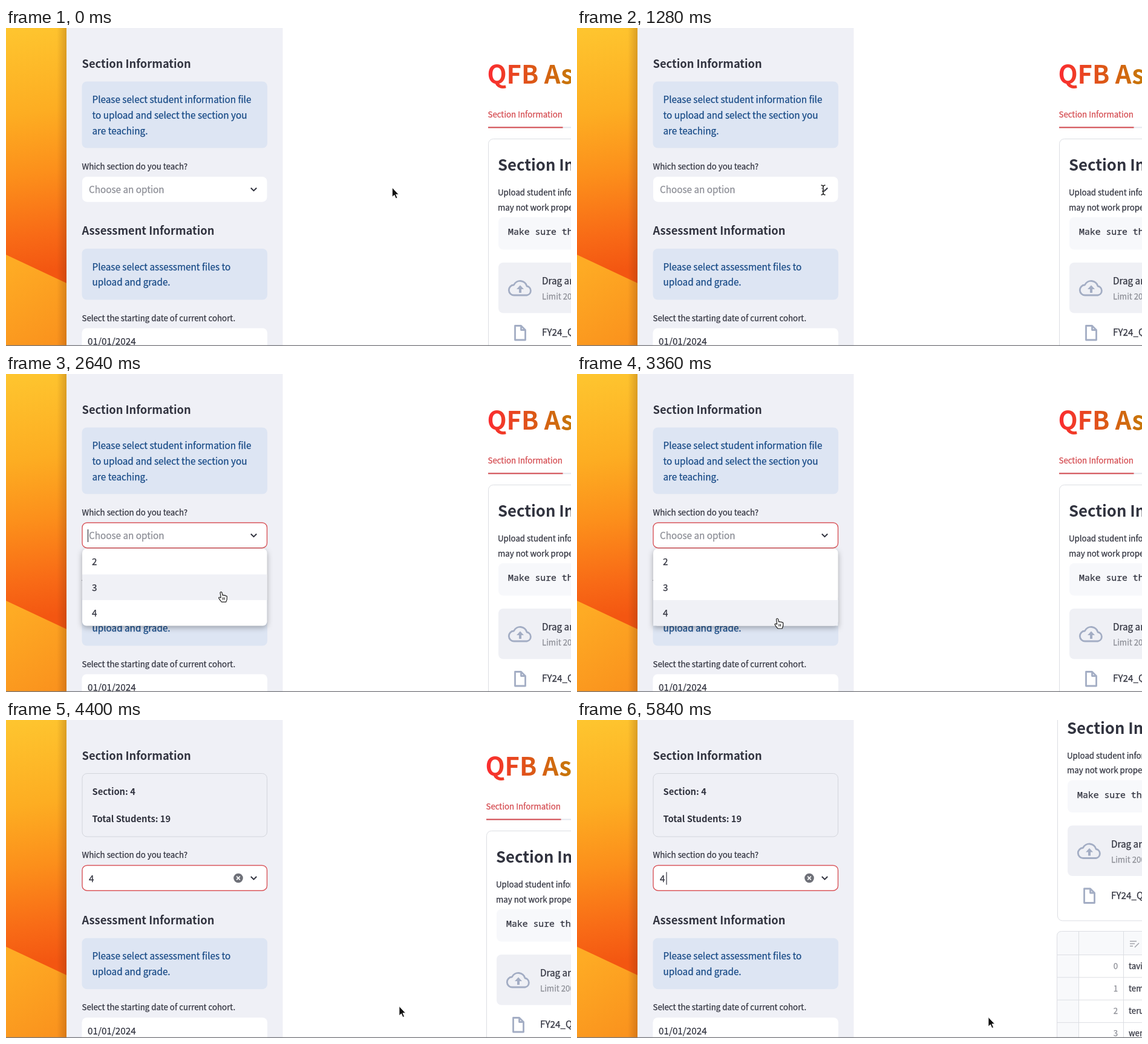
Animation, 934 px wide and 526 px high, one loop 5920 ms. Source, as an HTML page:

```html
<!DOCTYPE html>
<html lang="en">
<head>
<meta charset="utf-8">
<title>Section picker</title>
<style>
  html, body { margin: 0; width: 100%; height: 100%; overflow: hidden; background: #fff; }
  svg { display: block; width: 100vw; height: 100vh; }
  text {
    font: 15.25px "Noto Sans CJK JP", "Noto Sans CJK SC", "Noto Sans CJK", "Noto Sans", sans-serif;
    color: #31333f; fill: currentColor; stroke: currentColor; stroke-width: .25px; white-space: pre;
  }
  .small { font-size: 13.28px; }
  .bold { font-size: 14.7px; font-weight: 700; stroke: none; }
  .head { font-size: 18.3px; font-weight: 700; stroke: none; }
  .big { font-size: 25.7px; font-weight: 700; stroke: none; }
  .title { font-size: 41.7px; font-weight: 700; fill: url(#titleFill); stroke: none; }
  .mono { font-family: "Noto Sans Mono", "DejaVu Sans Mono", monospace; font-size: 14.8px; }
  .blue { color: #174a86; }
  .red { color: #d4494e; }
  .grey { color: #8b8d95; }
  .info { fill: #dde5f3; }
  .white { fill: #fff; }
  .line { fill: none; stroke: #dcdee3; }
  .icon { fill: none; stroke: #a3adc4; stroke-width: 2.8; stroke-linejoin: round; }
  #box { stroke-width: 1.4; }
  #menu { filter: drop-shadow(0 3px 5px rgba(0, 0, 0, .3)); }
</style>
</head>
<body>
<svg viewBox="0 0 934 526" preserveAspectRatio="none">
  <defs>
    <linearGradient id="sky" gradientUnits="userSpaceOnUse" x1="20" y1="0" x2="80" y2="400">
      <stop offset="0" stop-color="#fec52f"/>
      <stop offset=".35" stop-color="#fdad22"/>
      <stop offset=".6" stop-color="#fc8f1b"/>
      <stop offset=".85" stop-color="#f86a16"/>
      <stop offset="1" stop-color="#f35611"/>
    </linearGradient>
    <linearGradient id="dune" gradientUnits="userSpaceOnUse" x1="0" y1="400" x2="80" y2="526">
      <stop offset="0" stop-color="#feab24"/>
      <stop offset="1" stop-color="#fa921d"/>
    </linearGradient>
    <linearGradient id="shade">
      <stop offset="0" stop-color="#5a2000" stop-opacity="0"/>
      <stop offset="1" stop-color="#5a2000" stop-opacity=".22"/>
    </linearGradient>
    <linearGradient id="titleFill" gradientUnits="userSpaceOnUse" x1="797" y1="0" x2="937" y2="0">
      <stop offset="0" stop-color="#fb2c30"/>
      <stop offset=".5" stop-color="#de5618"/>
      <stop offset="1" stop-color="#c67808"/>
    </linearGradient>
  </defs>

  <rect class="white" width="934" height="526"/>
  <rect width="100" height="526" fill="url(#sky)"/>
  <path d="M0 375L100 422V526H0z" fill="url(#dune)"/>
  <rect x="84" width="16" height="526" fill="url(#shade)"/>
  <rect x="100" width="357.5" height="526" fill="#eff0f6"/>

  <!-- Main panel -->
  <g id="panel">
    <text class="title" x="795.5" y="91.5">QFB Assessment</text>
    <text class="small red" x="796.5" y="147.5">Section Information</text>
    <path d="M797 164.5H960" stroke="#e4e7ee" stroke-width="2"/>
    <path d="M797 164.5H920.5" stroke="#d4494e" stroke-width="2"/>
    <rect class="line" x="797.5" y="183.5" width="300" height="362" rx="8"/>
    <text class="big" x="813" y="236">Section Information</text>
    <text class="small" x="813" y="277">Upload student information file. The app</text>
    <text class="small" x="813" y="301.5">may not work properly without it.</text>
    <rect x="814" y="313" width="200" height="53.5" rx="8" fill="#f7f8fb"/>
    <text class="mono" x="830" y="342">Make sure the file is valid</text>
    <rect x="814" y="388" width="200" height="83.5" rx="8" fill="#eff0f5"/>
    <path class="icon" d="M840 442a8.5 8.5 0 0 1-.5-17a11.5 11.5 0 0 1 21.5 2a7.6 7.6 0 0 1 0 15z"/>
    <path d="M848 438v-6h-4l6-6.5 6 6.5h-4v6z" fill="#a3adc4"/>
    <text x="886" y="424">Drag and drop file here</text>
    <text class="small grey" x="886" y="449">Limit 200MB per file</text>
    <path class="icon" d="M841.5 492.5h10l7 7v16.500h-17zM851.5 492.5v7h7"/>
    <text x="886" y="509">FY24_QFB.csv</text>
    <g id="table"></g>
  </g>

  <!-- Sidebar -->
  <text class="head" x="125.5" y="66">Section Information</text>
  <g id="hint">
    <rect class="info" x="125.5" y="88.5" width="306.5" height="110" rx="8"/>
    <text class="blue" x="142.5" y="124">Please select student information file</text>
    <text class="blue" x="142.5" y="149.8">to upload and select the section you</text>
    <text class="blue" x="142.5" y="175.5">are teaching.</text>
  </g>
  <g id="summary">
    <rect class="line" x="126" y="88.5" width="305.5" height="104.5" rx="8" style="stroke:#d3d5dc"/>
    <text class="bold" x="142.5" y="124">Section: 4</text>
    <text class="bold" x="142.5" y="168.8">Total Students: 19</text>
  </g>
  <g id="lower">
    <text class="head" x="125.5" y="342">Assessment Information</text>
    <rect class="info" x="125.5" y="365" width="306.5" height="84.5" rx="8"/>
    <text class="blue" x="142.5" y="400.5">Please select assessment files to</text>
    <text class="blue" x="142.5" y="426">upload and grade.</text>
    <text class="small" x="125.5" y="484.5">Select the starting date of current cohort.</text>
    <rect class="white" x="125.5" y="496.5" width="306.5" height="42" rx="8"/>
    <text x="135" y="524">01/01/2024</text>
  </g>
  <g id="field">
    <text class="small" x="125.5" y="233.8">Which section do you teach?</text>
    <rect id="box" class="white" x="126" y="246" width="305.5" height="41.7" rx="8"/>
    <text id="placeholder" class="grey" x="137" y="273">Choose an option</text>
    <g id="chosen">
      <text x="137" y="273">4</text>
      <circle cx="384" cy="267" r="7.8" fill="#6e7078"/>
      <path d="M381.2 264.2l5.6 5.6m0-5.6l-5.6 5.6" stroke="#fff" stroke-width="1.7"/>
    </g>
    <path d="M404.8 264.5l4.7 4.6 4.7-4.6" fill="none" stroke="#31333f" stroke-width="2"/>
    <path id="caret" d="M0 257v21" stroke="#31333f" stroke-width="1.2"/>
  </g>
  <g id="menu">
    <rect class="white" x="126" y="289" width="305.5" height="127.5" rx="7"/>
    <rect id="hover" x="126" width="305.5" height="42.5" fill="#f0f1f6"/>
    <text x="142" y="316">2</text>
    <text x="142" y="358.5">3</text>
    <text x="142" y="401">4</text>
  </g>

  <rect y="524.7" width="934" height="1.3" fill="#77787d"/>

  <!-- Pointers, hot spot at the origin -->
  <g id="pointer">
    <path id="arrow" d="M0 0V15.500L3.500 12.300L6 18L8.500 17L6 11.300H10.500z" fill="#111" stroke="#fff" stroke-width=".8"/>
    <g id="beam" fill="none">
      <path d="M-3.5-8Q0-8 0-5V5Q0 8-3.5 8M3.5-8Q0-8 0-5M0 5Q0 8 3.5 8M-2 2H2" stroke="#fff" stroke-width="3"/>
      <path d="M-3.5-8Q0-8 0-5V5Q0 8-3.5 8M3.5-8Q0-8 0-5M0 5Q0 8 3.5 8M-2 2H2" stroke="#222" stroke-width="1.5"/>
    </g>
    <path id="hand" d="M-1.5 1.5Q0-1 1.5 1.5L2.5 6Q4 5 5 6.3Q7 5.5 7.6 7Q9.6 6.6 9.8 8.2Q10.3 12.5 8.2 17H1Q-2.5 13.5-4 10.2Q-3.5 8.2-.3 10zM3 9.5v4M5.5 9.5v4"
      fill="#fff" stroke="#222" stroke-width="1.2" stroke-linejoin="round"/>
  </g>
</svg>

<script>
const LOOP = 5920, STEP = 80;
const OPEN = 1440, PICK = 3520, RERUN = 3840;
const SCROLL_START = 4880, SCROLL_END = 5473, SCROLL_BY = 213.5;

// Pointer stops: time, x, y
const stops = [
  [0, 638.5, 264], [640, 419, 270], [1040, 407, 268], [2000, 407, 268],
  [3040, 331, 404], [3600, 331, 404], [4320, 650, 473.5], [4480, 650, 473.5], [4880, 680, 491.5]
];

const el = id => document.getElementById(id);
const show = (id, on) => el(id).style.display = on ? "" : "none";
const shift = (id, x, y) => el(id).setAttribute("transform", `translate(${x} ${y})`);
const clamp = u => Math.min(1, Math.max(0, u));
const ease = u => (1 - Math.cos(Math.PI * clamp(u))) / 2;

function buildTable() {
  const top = 563, first = 602, pitch = 37.3;
  let svg = `<rect x="796.5" y="${top}" width="300" height="400" rx="8" fill="#fff"/>
    <path d="M796.5 ${first}V571q0-8 8-8H960V${first}zM796.5 ${first}h36v300h-36z" fill="#f8f9fb"/>
    <path class="line" d="M960 ${top}H804.5q-8 0-8 8V960M832.5 ${top}V960M906.5 ${top}V960M796.5 ${first}H960"/>
    <path d="M917 579.5h11m-11 4h8m-8 4h5m3 2l7-7" fill="none" stroke="#a2a4ac" stroke-width="1.5"/>`;
  ["tavi", "temo", "teru", "wen"].forEach((name, i) => {
    const y = first + i * pitch;
    svg += `<path class="line" d="M796.5 ${y + pitch}H960"/>
      <text class="small grey" x="897" y="${y + 23}" text-anchor="end">${i}</text>
      <text class="small" x="915" y="${y + 23}">${name}</text>`;
  });
  el("table").innerHTML = svg;
}

function pointerAt(t) {
  const i = stops.findIndex(s => s[0] > t);
  if (i < 0) return stops[stops.length - 1].slice(1);
  const [t0, x0, y0] = stops[i - 1], [t1, x1, y1] = stops[i];
  const u = ease((t - t0) / (t1 - t0));
  return [x0 + (x1 - x0) * u, y0 + (y1 - y0) * u];
}

function draw(t) {
  const focused = t >= OPEN, picked = t >= PICK, done = t >= RERUN;
  const open = focused && !picked;
  const scroll = SCROLL_BY * ease((t - SCROLL_START) / (SCROLL_END - SCROLL_START));
  const [x, y] = pointerAt(t);

  shift("panel", done ? -3 : 0, -scroll);
  show("table", done);
  show("hint", !done);
  show("summary", done);
  shift("field", 0, done ? -5.5 : 0);
  shift("lower", 0, done ? -4.3 : 0);

  el("box").setAttribute("stroke", focused ? "#d9565b" : "none");
  show("placeholder", !picked);
  show("chosen", picked);
  show("caret", focused && (t - (picked ? PICK : OPEN)) % 1000 < 500);
  shift("caret", picked ? 148 : 135.5, 0);

  show("menu", open);
  const row = Math.min(2, Math.max(0, Math.floor((y - 289) / 42.5)));
  el("hover").setAttribute("y", 289 + row * 42.5);

  const inside = x > 126 && x < 432;
  const kind = open && inside && y > 289 ? "hand" : inside && y > 246 && y < 289 ? "beam" : "arrow";
  for (const name of ["arrow", "beam", "hand"]) show(name, name === kind);
  shift("pointer", x, y);
}

function tick() {
  draw(Math.floor(performance.now() % LOOP / STEP) * STEP);
  requestAnimationFrame(tick);
}

buildTable();
tick();
</script>
</body>
</html>
```
